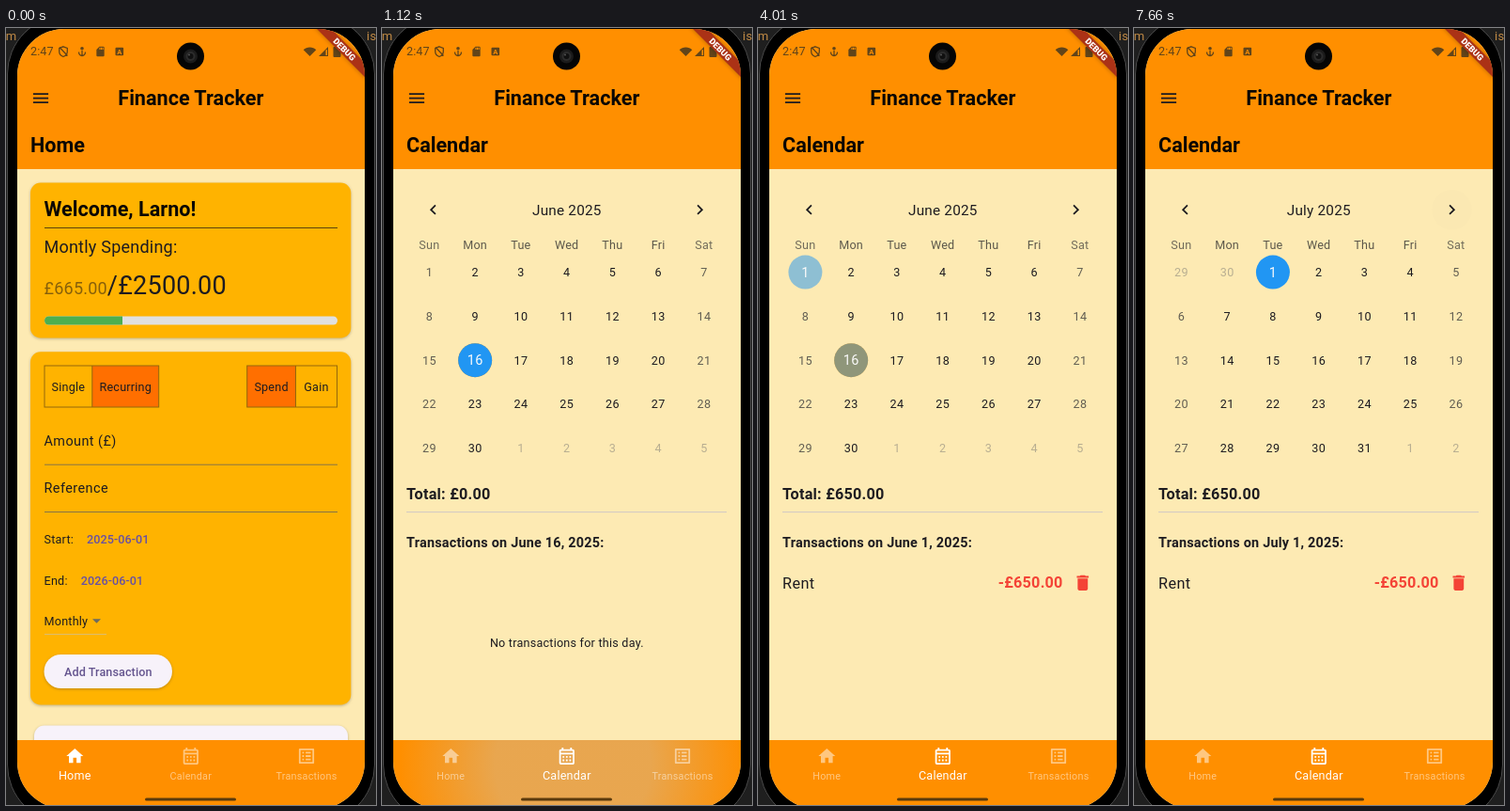
An HTML page for the animation above (8 s loop, 394x826 px).

```html
<!DOCTYPE html>
<html lang="en">
<head>
<meta charset="utf-8">
<title>Finance Tracker</title>
<style>
  html, body { margin: 0; width: 100%; height: 100%; overflow: hidden; background: #1f1f1f; }
  svg { display: block; width: 394px; height: 826px; font-family: Roboto, sans-serif; }
  .card { filter: drop-shadow(0 1px 1.5px rgba(0, 0, 0, .25)); }
</style>
</head>
<body>
<svg id="stage" viewBox="0 0 394 826" xmlns="http://www.w3.org/2000/svg"></svg>
<script>
const LOOP = 8000;
const INK = '#1d1b20', AMBER = '#ffb300', ORANGE = '#ff8f00', DEEP = '#ff6f00';
const CREAM = '#fdeab3', BLUE = '#2196f3', TODAY = '#ff9800', RED = '#f44336';
const PURPLE = '#6750a4', STATUS = '#614419', PAGE_WIDTH = 341.3;

const ICONS = {
  menu: 'M3 18h18v-2H3zM3 13h18v-2H3zM3 6v2h18V6z',
  home: 'M10 20v-6h4v6h5v-8h3L12 3 2 12h3v8z',
  calendar: 'M19 4h-1V2h-2v2H8V2H6v2H5c-1.11 0-1.99.9-1.99 2L3 20a2 2 0 0 0 2 2h14c1.1 0 2-.9 2-2V6c0-1.1-.9-2-2-2zm0 16H5V10h14zm0-12H5V6h14zM9 14H7v-2h2zm4 0h-2v-2h2zm4 0h-2v-2h2zm-8 4H7v-2h2zm4 0h-2v-2h2zm4 0h-2v-2h2z',
  list: 'M19 5v14H5V5h14m1.1-2H3.9c-.5 0-.9.4-.9.9v16.2c0 .4.4.9.9.9h16.2c.4 0 .9-.5.9-.9V3.9c0-.5-.5-.9-.9-.9zM11 7h6v2h-6zm0 4h6v2h-6zm0 4h6v2h-6zM7 7h2v2H7zm0 4h2v2H7zm0 4h2v2H7z',
  trash: 'M6 19c0 1.1.9 2 2 2h8c1.1 0 2-.9 2-2V7H6zM19 4h-3.5l-1-1h-5l-1 1H5v2h14z',
  left: 'M15.41 7.41L14 6l-6 6 6 6 1.41-1.41L10.83 12z',
  right: 'M10 6L8.59 7.41 13.17 12l-4.58 4.59L10 18l6-6z',
  down: 'M7 10l5 5 5-5z',
  wifi: 'M12 4C7.3 4 3.1 5.9 0 8.9L12 21 24 8.9C20.9 5.9 16.7 4 12 4z',
  signal: 'M2 22h20V2zM17 9v11h3V8z',
  sd: 'M18 2h-8L4 8v12a2 2 0 0 0 2 2h12a2 2 0 0 0 2-2V4a2 2 0 0 0-2-2zm-6 6h-2V4h2zm3 0h-2V4h2zm3 0h-2V4h2z'
};

const clamp = (v, lo = 0, hi = 1) => Math.min(hi, Math.max(lo, v));
const easeOut = p => 1 - (1 - p) ** 2.2;
// Screen updates arrive in ticks of about 69 ms after each tap.
const ticks = (t, start) => Math.floor((t - start + 7) / 69);

function text(x, y, str, size, { fill = INK, weight = 400, ls = .225, anchor = 'start', opacity = 1 } = {}) {
  return `<text x="${x}" y="${y}" font-size="${size}" fill="${fill}" font-weight="${weight}" letter-spacing="${ls}" text-anchor="${anchor}" opacity="${opacity}">${str}</text>`;
}
function rect(x, y, w, h, fill, rx = 0, extra = '') {
  return `<rect x="${x}" y="${y}" width="${w}" height="${h}" rx="${rx}" fill="${fill}" ${extra}/>`;
}
function circle(x, y, r, fill, opacity = 1) {
  return `<circle cx="${x}" cy="${y}" r="${r}" fill="${fill}" opacity="${opacity}"/>`;
}
function rule(x1, x2, y, color, width = 1) {
  return `<path d="M${x1} ${y}H${x2}" stroke="${color}" stroke-width="${width}"/>`;
}
function icon(name, x, y, fill = INK, size = 21.6, opacity = 1) {
  const s = size / 24;
  return `<path transform="translate(${x - size / 2} ${y - size / 2}) scale(${s})" d="${ICONS[name]}" fill="${fill}" fill-rule="evenodd" opacity="${opacity}"/>`;
}

const DEFS = `<defs>
  <clipPath id="screen"><rect x="12" y="1" width="370" height="829" rx="50"/></clipPath>
  <clipPath id="pages"><rect x="26" y="220" width="${PAGE_WIDTH}" height="252"/></clipPath>
  <clipPath id="navClip"><rect x="12" y="757" width="370" height="73"/></clipPath>
  <clipPath id="barClip"><rect x="41" y="306.5" width="312" height="9" rx="4.5"/></clipPath>
  <radialGradient id="splash">
    <stop offset=".45" stop-color="#d0bfa5"/><stop offset="1" stop-color="#d0bfa5" stop-opacity="0"/>
  </radialGradient>
</defs>`;

const DEVICE = rect(0, 0, 394, 826, '#1f1f1f')
  + text(-8, 13, 'om', 13, { fill: '#c08a45' }) + text(384, 13, 'is', 13, { fill: '#c08a45' })
  + rect(1.5, -13, 391, 858, '#000', 62, 'stroke="#4a4a4a"');

const STATUS_BAR = text(26, 29.3, '2:47', 12.6, { fill: STATUS, ls: .1 })
  + `<g fill="none" stroke="${STATUS}" stroke-width="1.3">
      <path d="M61 19.8l4.3 1.7v3.4q0 3.8-4.3 5.6q-4.3-1.8-4.3-5.6v-3.4zM57 20.5l8.5 9"/>
      <path d="M77.5 25.5q.2 3.7 3.5 4q3.3-.3 3.5-4M81 24v5"/>
    </g>`
  + circle(81, 21.8, 1.8, STATUS)
  + icon('sd', 100.5, 25, STATUS, 12.5)
  + rect(116.5, 20.7, 8.6, 8.6, STATUS, 1)
  + text(120.9, 27.8, 'A', 7.5, { fill: ORANGE, weight: 700, ls: 0, anchor: 'middle' })
  + icon('wifi', 323.5, 25, STATUS, 13.5)
  + icon('signal', 338, 25, STATUS, 12)
  + rect(348.5, 20, 8, 11, STATUS, 1) + rect(350.7, 18.8, 3.6, 2, STATUS);

const BANNER = `<g transform="translate(382 1) rotate(45)">
    ${rect(-40, 24.7, 80, 11.8, '#000', 0, 'opacity=".25" style="filter:blur(2px)"')}
    ${rect(-40, 25.2, 80, 10.8, '#ab3216')}
    ${text(0, 33.9, 'DEBUG', 9.2, { fill: '#fff', weight: 900, ls: 0, anchor: 'middle' })}
  </g>`;

const CAMERA = circle(196.5, 30, 14.5, '#050505') + circle(196.5, 30, 7.5, '#1b1b1b')
  + circle(196.5, 30, 5, '#2c2c2c') + circle(196.5, 30, 3, '#101010') + circle(195, 28.5, 1, '#555');

function appBar(title) {
  const bold = { fill: '#0a0704', weight: 700, ls: 0 };
  return rect(12, 0, 370, 150, ORANGE) + STATUS_BAR + icon('menu', 37, 74.6)
    + text(196.8, 82, 'Finance Tracker', 21.6, { ...bold, anchor: 'middle' })
    + text(26, 132, title, 21.6, bold);
}

function toggle(x, split, end, chosen, labels) {
  const border = '#93680c';
  const [from, to] = chosen ? [split, end] : [x, split];
  return rect(from, 359, to - from, 44, DEEP)
    + rect(x, 359, end - x, 44, 'none', 0, `stroke="${border}"`)
    + `<path d="M${split} 359v44" stroke="${border}"/>`
    + text((x + split) / 2, 385.5, labels[0], 12.6, { anchor: 'middle' })
    + text((split + end) / 2, 385.5, labels[1], 12.6, { anchor: 'middle' });
}

function homePage() {
  const date = { fill: PURPLE, weight: 500, ls: .09 };
  const field = { ls: .45 };
  return `<g class="card">${rect(26, 164.5, 341.3, 165, AMBER, 10.8)}${rect(26, 344.3, 341.3, 375.2, AMBER, 10.8)}${rect(30, 741.5, 334, 60, '#f7f2fa', 10.8)}</g>`
    + text(40.5, 199.5, 'Welcome, Larno!', 21.6, { fill: '#0a0704', weight: 700, ls: 0 })
    + rule(41, 353, 212.5, '#5c430c')
    + text(40.5, 239, 'Montly Spending:', 18)
    + text(40.5, 282.5, '£665.00', 18, { fill: '#87600a' })
    + text(107.8, 282.5, '/£2500.00', 27)
    + `<g clip-path="url(#barClip)">${rect(41, 306, 312, 10, '#e0e0e0')}${rect(41, 306, 83, 10, '#4caf50')}</g>`
    + toggle(41, 91.8, 162.7, 1, ['Single', 'Recurring'])
    + toggle(256.7, 308.5, 352.5, 0, ['Spend', 'Gain'])
    + text(40.5, 444, 'Amount (£)', 14.4, field) + rule(41, 353, 464.2, '#857448')
    + text(40.5, 494, 'Reference', 14.4, field) + rule(41, 353, 514.5, '#857448')
    + text(40.5, 548.3, 'Start:', 12.6) + text(86, 548.3, '2025-06-01', 12.6, date)
    + text(40.5, 591.5, 'End:', 12.6) + text(79.7, 591.5, '2026-06-01', 12.6, date)
    + text(40.5, 634.5, 'Monthly', 12.6) + icon('down', 96.5, 630, '#6b6b62')
    + rule(41, 107, 644.5, '#dbbd70')
    + `<g class="card">${rect(40.5, 666, 136.5, 36, '#f7f2fa', 18)}</g>`
    + text(62, 688.6, 'Add Transaction', 12.6, { ...date, fill: '#65558f' });
}

// marks: { dayNumber: [{ color, opacity }, ...] }
function monthGrid(offset, length, prevLength, marks) {
  let out = '';
  const colX = c => 50.4 + 48.75 * c;
  ['Sun', 'Mon', 'Tue', 'Wed', 'Thu', 'Fri', 'Sat'].forEach((name, c) => {
    out += text(colX(c), 235.3, name, 12.6, { fill: c % 6 ? '#5c584b' : '#716c5b', anchor: 'middle' });
  });
  for (let i = 0; i < 35; i++) {
    const c = i % 7, x = colX(c), y = 259.6 + 46.8 * Math.floor(i / 7);
    const day = i - offset + 1;
    const outside = day < 1 || day > length;
    const label = day < 1 ? day + prevLength : day > length ? day - length : day;
    const mark = !outside && marks[day];
    if (mark) {
      for (const m of mark) out += circle(x, y, 18, m.color, m.opacity);
      out += text(x, y + 5, label, 14.4, { fill: '#fafafa', anchor: 'middle' });
    } else {
      const fill = outside ? '#b8ae91' : c % 6 ? INK : '#625e52';
      out += text(x, y + 4.4, label, 12.6, { fill, anchor: 'middle' });
    }
  }
  return out;
}

function calendarPage(t) {
  const pickJune = clamp((ticks(t, 3940) + 1) / 4);
  const pickJuly = clamp((ticks(t, 7450) + 1) / 4);
  const arrowTick = ticks(t, 5560);
  const slide = easeOut(clamp((arrowTick - 1) / 5));

  const june = { 16: [{ color: TODAY, opacity: 1 }, { color: BLUE, opacity: 1 - pickJune }] };
  if (pickJune) june[1] = [{ color: BLUE, opacity: pickJune }];
  const july = pickJuly ? { 1: [{ color: BLUE, opacity: pickJuly }] } : {};

  const day = pickJuly ? 'July 1' : pickJune ? 'June 1' : 'June 16';
  const [name, amount] = pickJune ? ['Rent', '650.00'] : t >= 2350 ? ['Cinema', '15.00'] : ['', '0.00'];
  const bold = { weight: 700 };

  let out = '';
  if (arrowTick >= 0) {
    const press = clamp((arrowTick + 1) / 8);
    out += circle(338.5, 193.2, 21.6, '#49454f', .055 * press * (1 - pickJuly * .85));
  }
  out += icon('left', 54.5, 193.2) + icon('right', 338.5, 193.2)
    + text(196.8, 198.6, slide < .5 ? 'June 2025' : 'July 2025', 15.3, { anchor: 'middle' });

  out += '<g clip-path="url(#pages)">';
  if (slide < 1) out += `<g transform="translate(${-PAGE_WIDTH * slide})">${monthGrid(0, 30, 31, june)}</g>`;
  if (slide > 0) out += `<g transform="translate(${PAGE_WIDTH * (1 - slide)})">${monthGrid(2, 31, 30, july)}</g>`;
  out += '</g>';

  out += text(26, 501.2, `Total: £${amount}`, 16.2, bold) + rule(26, 367, 514.6, '#d0c8c4')
    + text(26, 551.8, `Transactions on ${day}, 2025:`, 14.4, bold);
  if (name) {
    out += text(26, 595.6, name, 16.2, { ls: .45 })
      + text(324.6, 595.2, `-£${amount}`, 16.2, { fill: RED, weight: 700, anchor: 'end' })
      + icon('trash', 345.8, 589.8, RED);
  } else {
    out += text(196.8, 658.2, 'No transactions for this day.', 12.6, { anchor: 'middle' });
  }
  return out;
}

function navItem(x, name, label, active) {
  const opacity = .5 + .5 * active;
  return icon(name, x, 774, '#fff', 21.6, opacity)
    + text(x, 798.8 - .3 * active, label, 10.8 + 1.8 * active, { fill: '#fff', anchor: 'middle', opacity });
}

function navBar(t) {
  const tick = ticks(t, 920);
  const active = easeOut(clamp(tick / 3));
  let ripple = '';
  if (tick === 0) {
    ripple = circle(197, 783, 32, '#fff', .08) + circle(212, 780, 6, '#fff', .12);
  } else if (tick > 0 && tick < 9) {
    const strength = tick < 3 ? .24 + .08 * tick : .48 * (9 - tick) / 6;
    ripple = circle(203, 783, 40 + 48 * Math.min(tick, 5), 'url(#splash)', strength);
  }
  return rect(12, 757, 370, 73, ORANGE)
    + `<g clip-path="url(#navClip)">${ripple}</g>`
    + navItem(73.3, 'home', 'Home', 1 - active)
    + navItem(196.8, 'calendar', 'Calendar', active)
    + navItem(320, 'list', 'Transactions', 0)
    + rect(148, 818.4, 97, 3.2, '#5b3a0c', 1.6);
}

function scene(t) {
  const home = ticks(t, 920) < 1;
  return DEFS + DEVICE + '<g clip-path="url(#screen)">'
    + rect(12, 1, 370, 829, CREAM)
    + (home ? homePage() : calendarPage(t))
    + appBar(home ? 'Home' : 'Calendar') + navBar(t) + BANNER
    + '</g>' + CAMERA;
}

const stage = document.getElementById('stage');
const start = performance.now();
let shown = '';
function frame() {
  const markup = scene((performance.now() - start) % LOOP);
  if (markup !== shown) stage.innerHTML = shown = markup;
  requestAnimationFrame(frame);
}
frame();
</script>
</body>
</html>
```
